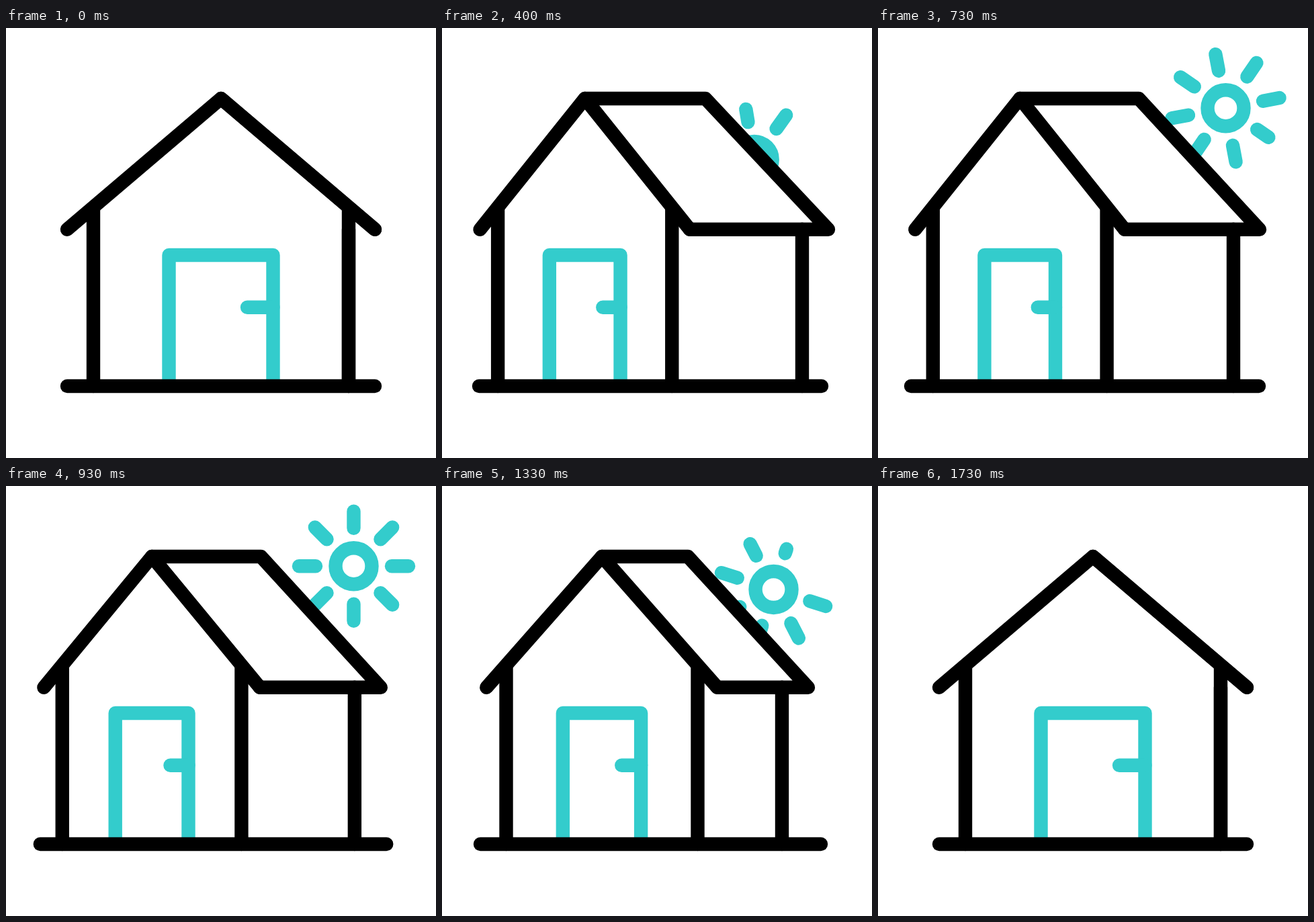
An HTML page with a canvas that plays this animation: 640 px wide and 640 px high, repeating every 2000 ms.

```html
<!DOCTYPE html>
<html lang="en">
<head>
<meta charset="utf-8">
<title>House and sun</title>
<style>
  html, body { margin: 0; width: 100%; height: 100%; overflow: hidden; background: #fff; }
  canvas { display: block; width: 100%; height: 100%; }
</style>
</head>
<body>
<canvas id="stage" width="640" height="640"></canvas>
<script>
const ctx = document.getElementById("stage").getContext("2d");
const BLACK = "#000", TEAL = "#33cccc", STROKE = 20.4;
const LOOP = 2000, FPS = 30;
const RIDGE = 105, EAVE = 299.8, GROUND = 533;

// Key times and the values of each moving part of the house
const times = [0, 230, 400, 480, 730, 1130, 1330, 1730];
const tracks = {
  center: [320, 263.2, 212.7, 207.6, 211.2, 225.5, 238, 320],
  scale: [1, .832, .682, .668, .681, .727, .75, 1],
  ridge: [320, 361, 392, 395, 388, 371, 366, 320],
  eave: [549, 563, 575, 577, 568, 549, 545, 549],
  groundL: [91, 74, 55, 49.7, 49, 54, 57, 91],
  groundR: [549, 556, 565, 566.5, 567, 565, 564, 549]
};

const clamp = x => Math.min(1, Math.max(0, x));
const ease = x => { x = clamp(x); return x * x * (3 - 2 * x); };

// 0 -> 1 from `a` lasting `da`, then back to 0 from `b` lasting `db`
const outAndBack = (t, a, da, b, db) => ease((t - a) / da) - ease((t - b) / db);

function slope(v, i) {
  return (v[i + 1] - v[i]) / (times[i + 1] - times[i]);
}

function tangent(v, i) {
  if (i === 0 || i === v.length - 1) return 0;
  const a = slope(v, i - 1), b = slope(v, i);
  return a * b > 0 ? 2 * a * b / (a + b) : 0;
}

// Monotone cubic interpolation
function sample(v, t) {
  const last = times.length - 1;
  if (t >= times[last]) return v[last];
  let i = 0;
  while (t >= times[i + 1]) i++;
  const h = times[i + 1] - times[i], x = (t - times[i]) / h, y = ease(x);
  return v[i] + (v[i + 1] - v[i]) * y
    + h * x * (1 - x) * ((1 - x) * tangent(v, i) - x * tangent(v, i + 1));
}

function line(color, points, cap = "round") {
  ctx.strokeStyle = color;
  ctx.lineCap = cap;
  ctx.beginPath();
  points.forEach(p => ctx.lineTo(...p));
  ctx.stroke();
}

function drawSun(t) {
  const depth = 158 * (1 - outAndBack(t, 234, 377, 1202, 377));
  const turn = -90 + 90 * outAndBack(t, 0, 930, 1100, 630);
  ctx.save();
  ctx.translate(517.5 - .567 * depth, 119.2 + .824 * depth);
  ctx.strokeStyle = TEAL;
  ctx.beginPath();
  ctx.arc(0, 0, 27, 0, 2 * Math.PI);
  ctx.stroke();
  ctx.rotate(turn * Math.PI / 180);
  for (let i = 0; i < 8; i++) {
    const delay = 54 * i;
    const length = 25 * outAndBack(t, 242 + delay, 149, 1178 + delay, 149);
    if (length > .05) line(TEAL, [[56.5, 0], [56.5 + length, 0]]);
    ctx.rotate(-Math.PI / 4);
  }
  ctx.restore();
}

function drawHouse(t) {
  const at = name => sample(tracks[name], t);
  const center = at("center"), scale = at("scale");
  const ridge = at("ridge"), eave = at("eave");
  const front = x => center + x * scale;
  const wallL = front(-190), wallR = front(190), wallBack = eave - 39;
  const doorL = front(-77.5), doorR = front(77.5);
  const apex = [center, RIDGE], eaveR = [front(229), EAVE];
  const wallTop = 270;

  ctx.fillStyle = "#fff";
  ctx.beginPath();
  [apex, [ridge, RIDGE], [eave, EAVE], [wallBack, GROUND], [wallL, GROUND], [wallL, wallTop]]
    .forEach(p => ctx.lineTo(...p));
  ctx.fill();

  line(TEAL, [[doorL, GROUND], [doorL, 338], [doorR, 338], [doorR, GROUND]], "butt");
  line(TEAL, [[front(39), 415.7], [doorR, 415.7]]);

  line(BLACK, [[wallL, wallTop], [wallL, GROUND]]);
  line(BLACK, [[wallR, wallTop], [wallR, GROUND]]);
  line(BLACK, [[wallBack, EAVE], [wallBack, GROUND]]);
  line(BLACK, [apex, [ridge, RIDGE], [eave, EAVE], eaveR]);
  line(BLACK, [[front(-229), EAVE], apex, eaveR]);
  line(BLACK, [[at("groundL"), GROUND], [at("groundR"), GROUND]]);
}

function draw() {
  // Stepped at 30 pictures a second, on a 10 ms grid
  const step = Math.floor((performance.now() % LOOP + 4) * FPS / 1000) % (LOOP * FPS / 1000);
  const t = Math.round(step * 100 / FPS) * 10;
  ctx.fillStyle = "#fff";
  ctx.fillRect(0, 0, 640, 640);
  ctx.lineWidth = STROKE;
  ctx.lineJoin = "round";
  drawSun(t);
  drawHouse(t);
  requestAnimationFrame(draw);
}
draw();
</script>
</body>
</html>
```
